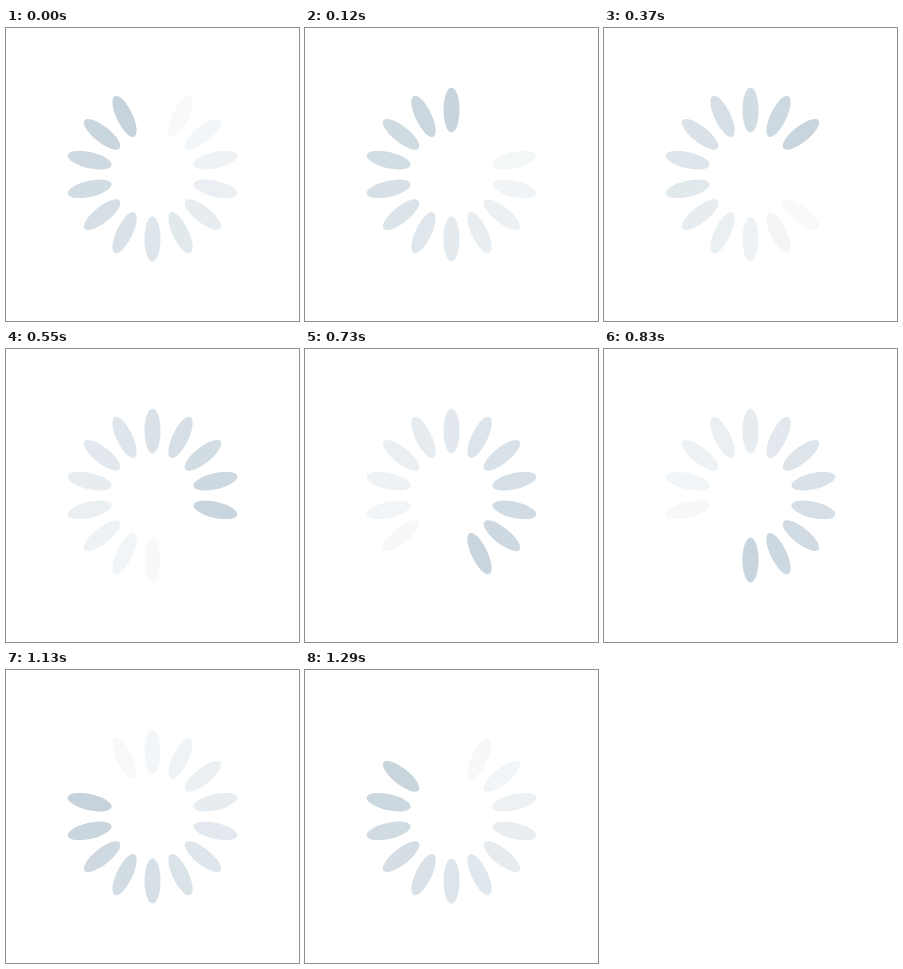
These frames come from a looping animation (293x293 px, 1320 ms). An HTML page:

```html
<!DOCTYPE html>
<html lang="en">
<head>
<meta charset="utf-8">
<title>Loading spinner</title>
<style>
  html, body { margin: 0; width: 100%; height: 100%; overflow: hidden; background: #fff; }
  svg { display: block; width: 100%; height: 100%; }
</style>
</head>
<body>
<svg id="stage" viewBox="0 0 293 293"></svg>
<script>
const NS = 'http://www.w3.org/2000/svg';
const LOOP = 1320, STEPS = 43, PETALS = 14;
const CENTER = 146.5, RADIUS = 64.5;
const HIDE_AGE = 0.87; // the faintest tail of the fade drops to white

const stage = document.getElementById('stage');
const petals = Array.from({ length: PETALS }, (_, k) => {
  const el = document.createElementNS(NS, 'ellipse');
  const attrs = {
    cx: CENTER, cy: CENTER - RADIUS, rx: 8, ry: 22.5, fill: '#c6d3dc',
    transform: `rotate(${k * 360 / PETALS} ${CENTER} ${CENTER})`
  };
  for (const name in attrs) el.setAttribute(name, attrs[name]);
  return stage.appendChild(el);
});

// Steps last 30 ms, with three evenly spread steps of 40 ms.
const stepStart = i => 30 * i + 10 * Math.floor(3 * i / STEPS + 0.25);

function stepAt(t) {
  let i = Math.min(STEPS - 1, Math.floor(t / 30));
  while (i > 0 && stepStart(i) > t) i--;
  return i;
}

function draw(ms) {
  const phase = stepAt(ms % LOOP) / STEPS;
  petals.forEach((el, k) => {
    const age = ((phase - (k + 1) / PETALS) % 1 + 1) % 1;
    el.setAttribute('opacity', age > HIDE_AGE ? 0 : 1 - age);
  });
}

let start = null;
function tick(now) {
  if (start === null) start = now;
  draw(Math.max(0, now - start));
  requestAnimationFrame(tick);
}
draw(0);
requestAnimationFrame(tick);
</script>
</body>
</html>
```
